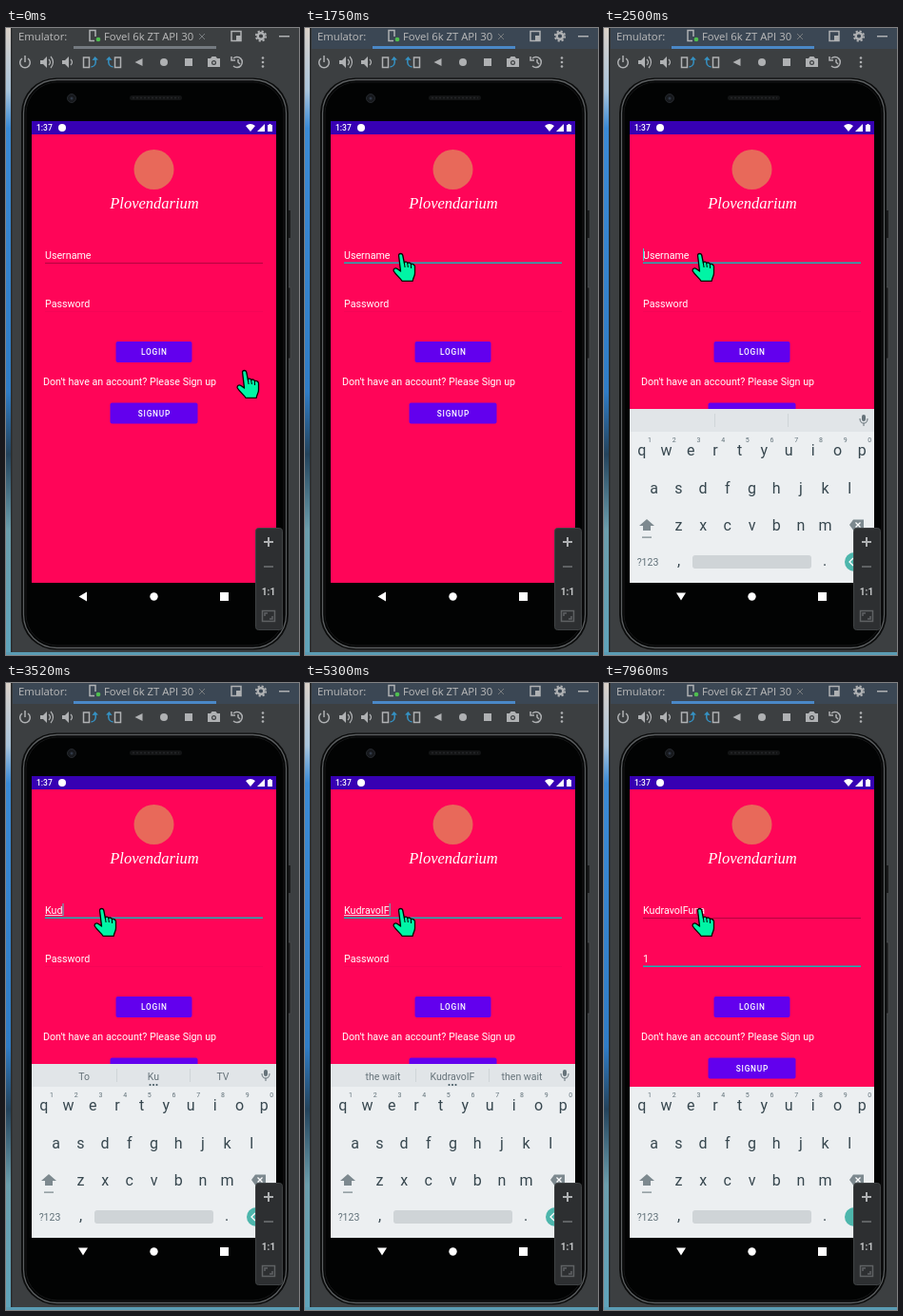
An HTML page for the animation above (8 s loop, 308x660 px).

```html
<!DOCTYPE html>
<html lang="en">
<head>
<meta charset="utf-8">
<title>Login screen</title>
<style>
html, body { margin: 0; width: 100%; height: 100%; overflow: hidden; background: #3c3f41; }
svg { display: block; width: 308px; height: 660px; }
text { font-family: Roboto, sans-serif; white-space: pre; }
.ide { font: 11.3px "Open Sans", "Noto Sans", sans-serif; fill: #bbbbbb; }
.field { font-size: 10.7px; fill: #fff; }
.button { font-size: 8.3px; font-weight: 500; letter-spacing: .75px; fill: #fff; text-anchor: middle; }
.key { font-size: 16px; fill: #37474f; text-anchor: middle; }
.hint { font-size: 7px; fill: #607078; text-anchor: middle; }
.sug { font-size: 10.5px; fill: #66737a; text-anchor: middle; }
.icon { fill: #afb1b3; stroke: none; }
.line { fill: none; stroke: #afb1b3; stroke-width: 1.5; }
</style>
</head>
<body>
<svg id="stage" viewBox="0 0 308 660" xmlns="http://www.w3.org/2000/svg"></svg>
<script>
const LOOP = 8000;
const USER = "KudravoIFuna";

const rect = (x, y, w, h, fill, more = "") =>
  `<rect x="${x}" y="${y}" width="${w}" height="${h}" fill="${fill}" ${more}/>`;
const text = (x, y, cls, str, more = "") =>
  `<text x="${x}" y="${y}" class="${cls}" ${more}>${str}</text>`;
const path = (d, cls, more = "") => `<path d="${d}" class="${cls}" ${more}/>`;
const circle = (x, y, r, fill, more = "") =>
  `<circle cx="${x}" cy="${y}" r="${r}" fill="${fill}" ${more}/>`;
const keyRow = (letters, x, y) =>
  [...letters].map((c, i) => text(x + i * 25.7, y, "key", c)).join("");

const defs = `<defs>
  <linearGradient id="wall" x2="0" y2="1">
    <stop offset="0" stop-color="#d9d0c8"/><stop offset=".1" stop-color="#a9c4dc"/>
    <stop offset=".16" stop-color="#3a8ad6"/><stop offset=".58" stop-color="#2f7cc6"/>
    <stop offset=".68" stop-color="#24435c"/><stop offset=".8" stop-color="#6b9dac"/>
    <stop offset="1" stop-color="#5fa3bb"/>
  </linearGradient>
  <clipPath id="screen"><path d="M27 98H284V601Q284 613 272 613H39Q27 613 27 601Z"/></clipPath>
</defs>`;

function windowChrome() {
  const speaker = x => path(`M${x - 5} 34h3l4-4v12l-4-4h-3z`, "icon");
  const device = (x, flip) => `<g transform="translate(${x} 36) scale(${flip} 1)">` +
    path("M-6.500-5h6v10.500h-6z", "line") +
    path("M1.500 5q6-1 4.500-8", "line", 'style="stroke:#3592c4"') +
    path("M2.500-2l3-4l3.500 3.500z", "", 'fill="#3592c4"') + "</g>";
  return rect(0, 0, 308, 660, "#3c3f41") +
    rect(0, 0, 5, 660, "url(#wall)") + rect(5, 0, 1.5, 657, "#2b2d2e") +
    rect(0, 657, 308, 3, "#5a9cb4") +
    `<rect id="header" x="7" y="0" width="301" height="22"/>` +
    text(13, 13, "ide", "Emulator:") +
    path("M94 9v-6.500h-6v11h5", "line") + circle(97, 12, 2.3, "#4fbf4f") +
    text(103, 13, "ide", "Fovel 6k ZT API 30") +
    path("M203 6l6 6m0-6l-6 6", "line", 'style="stroke:#777b7e;stroke-width:1"') +
    `<rect id="tab" x="71" y="19" width="150" height="3"/>` +
    path("M237 3.500h10v10h-10z", "line") + rect(242, 8, 5, 5, "#afb1b3") +
    circle(268, 8.5, 3.3, "none", 'stroke="#afb1b3" stroke-width="2.4"') +
    circle(268, 8.5, 5.2, "none", 'stroke="#afb1b3" stroke-width="1.8" stroke-dasharray="2.2 1.88"') +
    rect(287, 8, 11, 1.5, "#afb1b3") +
    path("M17 32a5.300 5.300 0 1 0 6 0M20 29v7", "line") +
    speaker(41) + path("M45 33q3 3 0 6m2-9q5 6 0 12", "line", 'style="stroke-width:1.2"') +
    speaker(64) + path("M68 33q3 3 0 6", "line", 'style="stroke-width:1.2"') +
    device(88, 1) + device(114, -1) +
    path("M143.500 32v8l-8-4z", "icon") + circle(166, 36, 4, "#afb1b3") +
    rect(188, 32, 8, 8, "#afb1b3") +
    path("M212 32h3l1.500-2h4l1.500 2h3v9h-13z", "icon") +
    circle(218.5, 36.5, 2.5, "#3c3f41") + circle(218.5, 36.5, 1.3, "#afb1b3") +
    path("M239 32a5.500 5.500 0 1 1 0 8M237 30v4h4M244 33v3l2 2", "line") +
    [31.5, 36, 40.5].map(y => circle(270, y, 1.3, "#afb1b3")).join("");
}

function phone() {
  return rect(296, 192, 3, 29, "#191a1b") + rect(296, 273, 3, 75, "#191a1b", 'stroke="#505355" stroke-width=".6"') +
    rect(16, 52.5, 281, 602, "#0b0c0c", 'rx="37"') +
    rect(18.5, 54.5, 276, 598, "#020303", 'rx="35" stroke="#5b5e60" stroke-width="1.3"') +
    rect(21, 57, 271, 593, "#020303", 'rx="33" stroke="#161718"') +
    circle(69, 74, 4.5, "#17191d", 'stroke="#25282d"') + circle(69, 74, 1.5, "#303846") +
    rect(130, 71, 55, 5, "#131415", 'rx="2.5"') +
    path("M133 73.500H182", "", 'stroke="#252729" stroke-width="1.5" stroke-dasharray="2 2"');
}

function app() {
  return rect(27, 98, 257, 486, "#ff0558") + rect(27, 98, 257, 14, "#3700b3") +
    text(32, 108.3, "field", "1:37", 'style="font-size:8.5px;font-weight:500"') +
    circle(59, 105, 4, "#fff") +
    path("M252 103q5-4 10 0l-5 6zM272 101v8h-8zM275 102h1.500v-1h2v1h1.500v7h-5z", "", 'fill="#fff"') +
    circle(155.5, 149, 21, "#e8695a") +
    text(156, 190, "", "Plovendarium", `fill="#fff" text-anchor="middle" style="font:italic 16.5px 'Liberation Serif',serif"`) +
    `<rect id="userLine" x="41" width="229"/><rect id="passLine" x="41" width="229"/>` +
    text(41, 243, "field", "", 'id="user"') + text(41, 294, "field", "", 'id="pass"') +
    rect(41, 244, 0, 1, "#ffd0df", 'id="compose"') +
    rect(41, 232, 1, 13, "#3ccfc5", 'id="caret"') +
    rect(115.5, 330, 80, 22, "#6200ee", 'rx="2"') + text(155.9, 344.3, "button", "LOGIN") +
    text(39, 376, "field", "Don't have an account? Please Sign up") +
    rect(109.5, 394.5, 92, 22, "#6200ee", 'rx="2"') + text(155.9, 408.6, "button", "SIGNUP");
}

function keyboard() {
  return `<g id="keyboard"><g id="bar">` +
    rect(27, 401, 257, 24, "#e1e5e8") +
    rect(116, 406, .8, 14, "#cbd1d4") + rect(193, 406, .8, 14, "#cbd1d4") +
    [82, 155, 228].map((x, i) => text(x, 417.5, "sug", "", `id="sug${i}"`)).join("") +
    `<g id="dots">${[151.5, 155, 158.5].map(x => circle(x, 423, 1.1, "#455a64")).join("")}</g>` +
    rect(271, 407, 4, 7, "#66737a", 'rx="2"') +
    path("M269 411q0 5 4 5t4-5M273 416v3", "", 'fill="none" stroke="#66737a"') + `</g>` +
    rect(27, 425, 257, 159, "#eceff1") +
    keyRow("qwertyuiop", 39.9, 450) + keyRow("asdfghjkl", 52.7, 489.5) + keyRow("zxcvbnm", 78.4, 528.6) +
    [..."1234567890"].map((c, i) => text(48 + i * 25.7, 436, "hint", c)).join("") +
    path("M45 517l8 7h-4v5h-8v-5h-4zM40 535.500h10v1.300h-10z", "", 'fill="#7d898f"') +
    path("M258 523l4-5.500h11v11h-11z", "", 'fill="#7d898f"') +
    path("M264.500 520.500l5 5m0-5l-5 5", "", 'stroke="#fff" stroke-width="1.2"') +
    text(46, 566, "key", "?123", 'style="font-size:10.5px;fill:#607078"') +
    text(78.5, 566, "key", ",") + text(232, 566, "key", ".") +
    rect(93, 555, 125, 14, "#cfd4d7", 'rx="3"') +
    circle(263, 562, 10, "#4db6ac") +
    path("M262 558l-4 4l4 4", "", 'id="enter" fill="none" stroke="#fff" stroke-width="1.3"') + `</g>`;
}

function sidePanel() {
  return rect(262.5, 526.5, 28, 107, "#2d2f31", 'rx="3" stroke="#3f4244"') +
    path("M271 541h10M276 536v10", "line", 'style="stroke-width:2"') +
    path("M271 567h10", "line", 'style="stroke:#5f6264;stroke-width:2"') +
    text(276, 597, "", "1:1", 'text-anchor="middle" fill="#c5c7c8" style="font-size:10px;font-weight:700"') +
    path("M269.500 613.500h13v11h-13zM272 619v-3h3M280 619v3h-3", "line", 'style="stroke:#5f6264"');
}

const hand = `<g id="hand"><path d="M6.500 2C7 0 10 0 10.700 2L12.300 10C13 8.500 15.500 9 15.800 10.500
  C17 9.500 19 10 19.400 11.700C21 11 23.500 12 23.500 14V21C23.500 24.500 21.500 26 21.200 29.300H10
  C9 27 4 23.500 1.300 19C.5 16.300 3 15.300 5 16.500L8.500 19Z" fill="#00f5a5" stroke="#000"
  stroke-width="1.300" stroke-linejoin="round"/>
  <path d="M12.300 10l.8 5M15.800 11l.5 4M19.400 12l.2 4" stroke="#000" fill="none"/></g>`;

const stage = document.getElementById("stage");
stage.innerHTML = defs + windowChrome() + phone() +
  `<g clip-path="url(#screen)">${app()}${keyboard()}</g>` +
  path("", "", 'id="back" fill="#fff"') + circle(155.5, 598.5, 4.2, "#fff") + rect(225, 594, 9, 9, "#fff") +
  sidePanel() + hand;

const el = {};
stage.querySelectorAll("[id]").forEach(node => el[node.id] = node);
const set = (id, attrs) => { for (const k in attrs) el[id].setAttribute(k, attrs[k]); };
const show = (id, on) => set(id, { visibility: on ? "inherit" : "hidden" });

// Each track lists [start time, value]; a value holds until the next start.
const handTrack = [[0, [242, 360]], [120, [238, 356]], [270, [155, 294]], [420, [106, 252]], [570, [92, 237]]];
const typedTrack = [[0, 0], [2620, 1], [2980, 2], [3520, 3], [3760, 4], [4000, 5], [4240, 6], [4370, 7],
  [4920, 8], [5180, 9], [5550, 10], [5670, 11], [6040, 12]];
const name = n => USER.slice(0, n);
const sugTrack = [[0, ["", "", ""]], [2740, ["To", name(1), "TV"]], [2980, ["To", name(2), "TV"]],
  [3640, ["the", name(3), "then"]], [3880, ["the", name(4), "then"]], [4120, ["the", name(5), "then"]],
  [4510, ["the ass", name(7), "then as"]], [5040, ["the si", name(8), "then si"]],
  [5300, ["the wait", name(9), "then wait"]], [6160, ["the nasi tech", name(12), "the dei tech"]]];
const caretTrack = [[0, false], [1250, true], [1750, false], [2500, true], [6660, false], [7030, true], [7960, false]];

const at = (track, t) => track.reduce((value, [start, next]) => t >= start ? next : value, track[0][1]);

const underline = (y, focused, idle) => focused
  ? { y: y - .5, height: 1.5, fill: "#16b3b3" }
  : { y, height: 1, fill: idle };

function draw(t) {
  const active = t >= 1130, onPass = t >= 6910, bar = t < 7030;
  set("header", { fill: active ? "#3b4754" : "#3c3f41" });
  set("tab", { fill: active ? "#4a88c7" : "#747a80" });

  const count = at(typedTrack, t), pass = t >= 7430 ? "1" : "";
  el.user.textContent = name(count) || "Username";
  el.pass.textContent = pass || "Password";
  const userWidth = count ? el.user.getComputedTextLength() : 0;
  set("compose", { width: userWidth });
  show("compose", !onPass && !(t >= 4370 && t < 4510));
  set("userLine", underline(247, t >= 1250 && !onPass, "#b5043f"));
  set("passLine", underline(298, onPass, "#f50556"));
  set("caret", { x: 41 + (onPass ? (pass ? 6 : 0) : userWidth), y: onPass ? 283 : 232 });
  show("caret", at(caretTrack, t));

  show("keyboard", t >= 2000);
  set("keyboard", { transform: `translate(0 ${t < 2250 ? 34 : 0})` });
  show("bar", bar);
  show("enter", bar);
  const sug = at(sugTrack, t);
  sug.forEach((word, i) => el["sug" + i].textContent = word);
  show("dots", bar && !!sug[1] && t >= 2000);
  set("back", { d: t >= 2500 ? "M76 594.500h10l-5 8z" : "M85 593.500v10l-8.500-5z" });

  set("hand", { transform: `translate(${at(handTrack, t)})` });
}

const start = performance.now();
function tick() {
  draw((performance.now() - start) % LOOP);
  requestAnimationFrame(tick);
}
tick();
</script>
</body>
</html>
```
